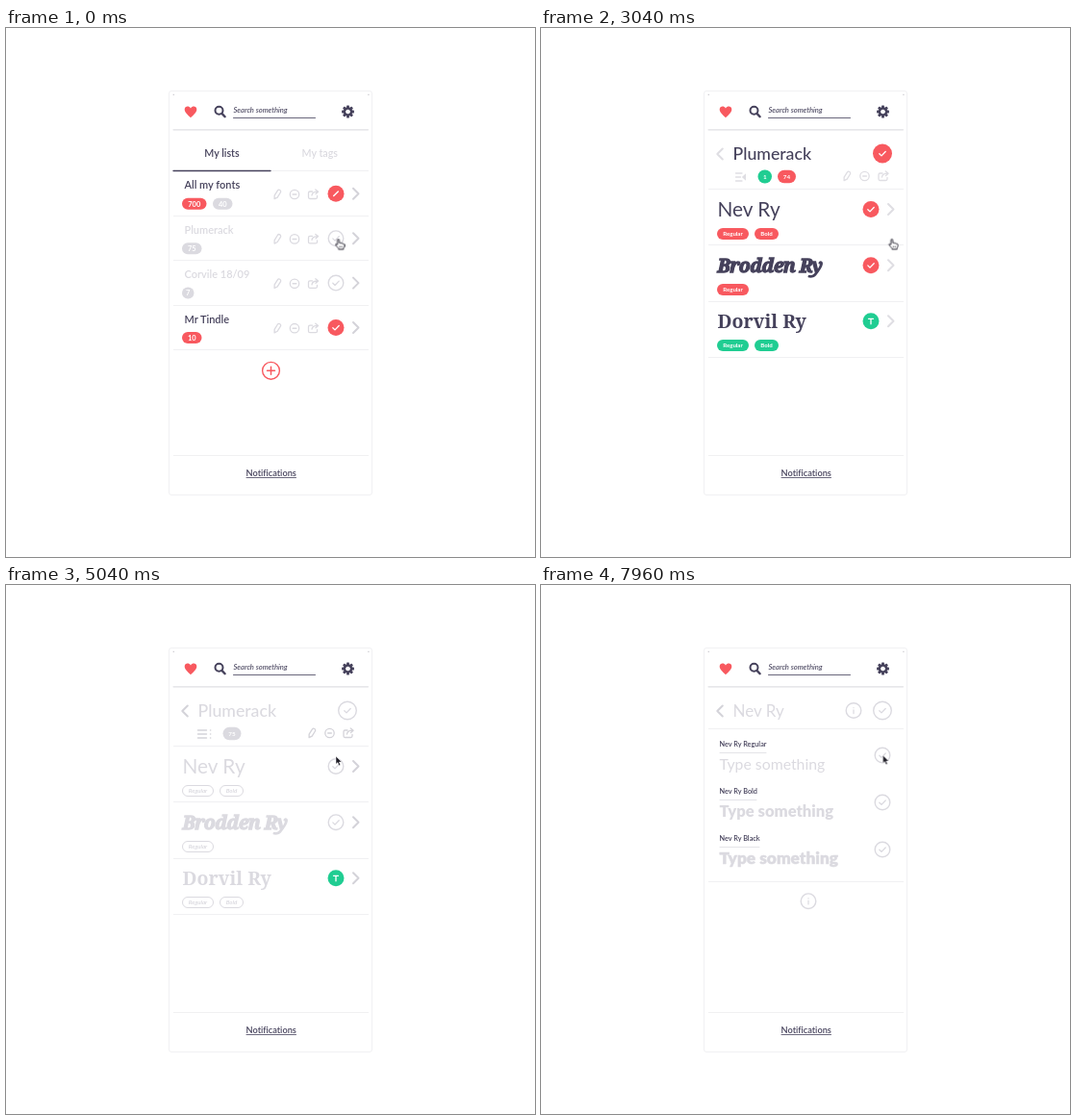
Recreate the animation shown at these times as an HTML page. Size 550 px wide and 550 px high, loop 8 s.

```html
<!DOCTYPE html>
<html lang="en">
<head>
<meta charset="utf-8">
<title>Font lists</title>
<style>
html, body { margin: 0; width: 100%; height: 100%; overflow: hidden; background: #fff; }
svg { display: block; width: 100vw; height: 100vh; --dark: #45415b; --gray: #dbdae0; --red: #f8595f; --green: #20cd92; }
text { font-family: Lato, "Open Sans", sans-serif; font-variant-ligatures: none; }
.line { stroke: #f0f0f2; stroke-width: 1; }
.stroke { fill: none; stroke-linecap: round; stroke-linejoin: round; }
.scene { animation: 8s step-end infinite; }
.lists { animation-name: lists; }
.before { animation-name: before; }
.after { animation-name: after; }
.family-on { animation-name: familyOn; }
.family-off { animation-name: familyOff; }
.styles { animation-name: styles; }
.hand { animation-name: hand; }
.arrow { animation-name: arrow; }
.cursor { animation: move 8s ease-in-out infinite; }
@keyframes lists { 0% { visibility: visible } 22%, 100% { visibility: hidden } }
@keyframes before { 0% { visibility: visible } 5%, 100% { visibility: hidden } }
@keyframes after { 0% { visibility: hidden } 5% { visibility: visible } 22%, 100% { visibility: hidden } }
@keyframes familyOn { 0% { visibility: hidden } 22% { visibility: visible } 51%, 100% { visibility: hidden } }
@keyframes familyOff { 0% { visibility: hidden } 51% { visibility: visible } 75%, 100% { visibility: hidden } }
@keyframes styles { 0% { visibility: hidden } 75%, 100% { visibility: visible } }
@keyframes hand { 0% { visibility: visible } 58% { visibility: hidden } 65% { visibility: visible } 75.5%, 100% { visibility: hidden } }
@keyframes arrow { 0% { visibility: hidden } 58% { visibility: visible } 65% { visibility: hidden } 75.5%, 100% { visibility: visible } }
@keyframes move {
  0%, 10% { transform: translate(345.5px, 219.5px) }
  13.5%, 42.5% { transform: translate(364.7px, 219.5px) }
  47.5%, 52.5% { transform: translate(354.5px, 142px) }
  62%, 63.5% { transform: translate(343px, 178px) }
  68.5%, 75.5% { transform: translate(364px, 186px) }
  79.5%, 92% { transform: translate(358.5px, 155px) }
  98.5%, 100% { transform: translate(355.5px, 177px) }
}
</style>
</head>
<body>
<svg id="stage" viewBox="0 0 550 550"></svg>
<script>
const dark = 'var(--dark)', gray = 'var(--gray)', red = 'var(--red)', green = 'var(--green)';

const group = (name, ...parts) => `<g class="${name}">${parts.join('')}</g>`;
const text = (x, y, size, label, fill = dark, extra = '') =>
  `<text x="${x}" y="${y}" font-size="${size}" fill="${fill}" ${extra}>${label}</text>`;
const path = (d, color, width = 1.3, extra = '') =>
  `<path class="stroke" d="${d}" stroke="${color}" stroke-width="${width}" ${extra}/>`;
const rule = (y, x1 = 174, x2 = 377) => `<path class="line" d="M${x1} ${y + .5}H${x2}"/>`;
const disc = (x, y, r, color, filled) => filled
  ? `<circle cx="${x}" cy="${y}" r="${r}" fill="${color}"/>`
  : `<circle cx="${x}" cy="${y}" r="${r - .7}" fill="none" stroke="${color}" stroke-width="1.4"/>`;

const semibold = 'font-weight="600"', middle = 'text-anchor="middle"';

function pill(x, y, w, label, color, outlined = false, size = 7.5, h = 12) {
  const inset = outlined ? .5 : 0;
  const box = `<rect x="${x + inset}" y="${y - h / 2 + inset}" width="${w - 2 * inset}" height="${h - 2 * inset}" rx="${h / 2 - inset}"`;
  const paint = outlined ? `fill="none" stroke="${color}"` : `fill="${color}"`;
  return `${box} ${paint}/>` + text(x + w / 2, y + size * .36, size, label, outlined ? color : '#fff',
    `font-weight="700" ${middle} ${outlined ? 'font-style="italic"' : ''}`);
}

const check = (x, y, r, on) => disc(x, y, r, on ? red : gray, on) +
  path(`M${x - 3.2} ${y + .2}l2.2 2.2l4.2 -4.4`, on ? '#fff' : gray, 1.3);
const partial = (x, y) => disc(x, y, 8.5, red, true) + path(`M${x - 2.3} ${y + 2.3}l4.6 -4.6`, '#fff', 1.4);
const trial = (x, y, on) => disc(x, y, 8.5, on ? green : gray, on) +
  path(`M${x - 2.5} ${y - 2.5}h5M${x} ${y - 2.5}v5.5`, on ? '#fff' : gray, 1.3);
const info = (x, y) => disc(x, y, 8.5, gray) + path(`M${x} ${y - 3}v.2M${x} ${y - .6}v3.8`, gray, 1.2);
const chevron = (x, y, color = '#d4d3d9') => path(`M${x - 2.5} ${y - 5.5}l5.5 5.5l-5.5 5.5`, color, 2);
const back = (y, color) => path(`M188.8 ${y - 5.5}l-5.5 5.5l5.5 5.5`, color, 2);

function tools(xs, y, color) {
  const [pen, minus, share] = xs;
  return path('M-1.8 -3.5a1.8 1.8 0 0 1 3.6 0V2.5L0 5.5L-1.8 2.5Z', color, 1.3, `transform="translate(${pen} ${y}) rotate(32)"`) +
    `<circle class="stroke" cx="${minus}" cy="${y}" r="4.7" stroke="${color}" stroke-width="1.3"/>` +
    path(`M${minus - 1.8} ${y}h3.6`, color, 1.5) +
    path(`M${share - 1} ${y - 3}h-2.5q-1.5 0 -1.5 1.5v4.5q0 1.5 1.5 1.5h6q1.5 0 1.5 -1.5v-1.5` +
      `M${share - 1.5} ${y + 1}q.5 -3.5 5 -3.8M${share + 2.3} ${y - 5}l2.8 2.2l-2.6 2.3`, color, 1.3);
}

function listRow(i, name, on, pills, mark) {
  const y = 172.3 + i * 46.4;
  return text(185.5, y - 5, 11, name, on ? dark : gray, semibold) + pills(y + 10.5) +
    tools([282, 300, 319.5], y + .7, gray) + (mark || check)(343, y, 8.5, on) + chevron(363.5, y);
}

function familyPage(on) {
  const ink = on ? dark : gray, tool = on ? '#dfdee3' : '#d4d3d9';
  const tag = (x, y, w, label, color) => pill(x, y, w, label, on ? color : gray, !on, 6.1);
  const row = (y, name, size, style, mark) =>
    text(183.5, y + 7.5, size, name, ink, style) + mark(343, y, 8.5, on) + chevron(363.5, y, tool);
  return back(131, tool) + text(199.5, 136.7, 17.7, 'Plumerack', ink, 'font-weight="500"') +
    check(355, 130.5, 10, on) +
    (on
      ? path('M202.5 151h6.5M202.5 155h5M202.5 159h6.5', tool, 1.3) + `<path d="M213 151.3v7.4l-4.2 -3.7z" fill="${tool}"/>` +
        pill(225.5, 154.5, 14.5, '1', green, false, 6.3, 14) + pill(246, 154.5, 19, '74', red, false, 6.3, 13.5)
      : path('M199.5 151h9M199.5 155h9M199.5 159h9M212.5 151h.2M212.5 155h.2M212.5 159h.2', tool, 1.5) +
        pill(225.5, 154.5, 19, '75', gray, false, 6.3, 13.5)) +
    tools([318, 336.5, 356], 154, tool) + [167, 225, 284, 342].map(y => rule(y)).join('') +
    row(188.5, 'Nev Ry', 20.8, '', check) +
    tag(183, 214, 33, 'Regular', red) + tag(222, 214, 25, 'Bold', red) +
    row(246.7, 'Brodden Ry', 19.5,
      `style="font:italic 900 19.5px 'Noto Serif',serif;letter-spacing:-.6px" stroke="${ink}" stroke-width="1.3"`, check) +
    tag(183, 272, 33, 'Regular', red) +
    row(304.8, 'Dorvil Ry', 19.5, `style="font:600 19.5px 'Noto Serif',serif"`, trial) +
    tag(183, 330, 33, 'Regular', green) + tag(222, 330, 25, 'Bold', green);
}

function styleRow(y, style, width, size, weight, extra = '') {
  return text(185.5, y - 9.5, 7.3, 'Nev Ry ' + style, dark, semibold) +
    path(`M186 ${y - 2.5}h${width}`, '#e4e4e8', 1) +
    text(185.5, y + 15, size, 'Type something', gray, `font-weight="${weight}" ${extra}`) + check(355, y, 8.5, false);
}

const gearTeeth = Array.from({ length: 8 }, (_, i) =>
  `<rect x="-1.4" y="-6.4" width="2.8" height="4" rx=".5" transform="rotate(${i * 45})"/>`).join('');

const frame =
  `<rect x="169.5" y="65.5" width="211" height="420" rx="2.5" fill="#fff" stroke="#f1f1f3"/>` +
  path('M174 69.3h.6M376.6 69.3h.6', '#a9a8b0', .7) +
  `<path d="M192 93.2C188.5 90 185.7 87.6 185.7 84.8C185.7 81.3 190 80.3 192 83.5C194 80.3 198.3 81.3 198.3 84.8C198.3 87.6 195.5 90 192 93.2Z" fill="${red}"/>` +
  `<circle class="stroke" cx="221.5" cy="85.8" r="4" stroke="${dark}" stroke-width="2"/>` +
  path('M224.8 89.2l2.8 3', dark, 2.4) +
  text(236.5, 88, 7.6, 'Search something', dark, 'font-style="italic" font-weight="500"') +
  path('M236.5 93.5H321.5', dark, .8) +
  `<g transform="translate(355.5 87)" fill="${dark}">${gearTeeth}<circle r="3.6" fill="none" stroke="${dark}" stroke-width="2.2"/></g>` +
  path('M174 105.8H376.5', '#e0e0e4', 1.2) + rule(444) +
  text(275.7, 465.8, 9.2, 'Notifications', dark, `${semibold} ${middle}`) + path('M250 467.5H301.5', dark, .8);

const lists =
  text(224.5, 133.7, 10.7, 'My lists', dark, `${semibold} ${middle}`) +
  text(326.3, 133.7, 10.7, 'My tags', gray, `${semibold} ${middle}`) +
  [148, 195, 241, 288, 334].map(y => rule(y)).join('') +
  path('M174 148.5H275', dark, 1.3) +
  listRow(0, 'All my fonts', true, y => pill(183, y, 25.5, '700', red) + pill(215, y, 20.5, '40', gray), partial) +
  listRow(2, 'Corvile 18/09', false, y => pill(183, y, 12.5, '7', gray)) +
  listRow(3, 'Mr Tindle', true, y => pill(183, y, 20.5, '10', red)) +
  disc(275.5, 356.3, 9.6, red) + path('M271.5 356.3h8M275.5 352.3v8', red, 1.5);

const styles =
  back(131, '#d4d3d9') + text(199.5, 136.7, 17, 'Nev Ry', gray) +
  info(325, 130.5) + check(355, 130.5, 10, false) + rule(149) +
  styleRow(177, 'Regular', 48, 15.8, 400) +
  styleRow(226, 'Bold', 38, 16.6, 900) +
  styleRow(275, 'Black', 41, 17.3, 900, `stroke="${gray}" stroke-width=".5"`) +
  rule(308) + info(278, 328.7);

const hand = `<path d="M-.9 1Q-.9 0 0 0Q1 0 1 1V4Q2.2 3.4 2.9 4.3Q4 3.8 4.6 4.8Q6.4 4.6 6.4 6.3Q6.4 8 5.4 9.3V10.6H.2V9.6Q-1.5 8 -3 5.7Q-3 4.2 -.9 5.7Z"
  fill="#fff" stroke="#302e3a" stroke-width="1" stroke-linejoin="round"/><path d="M1.6 7v2M3.4 7v2" stroke="#302e3a" stroke-width=".6"/>`;
const arrow = `<path d="M0 0V8.3L1.9 6.6L3.2 9.7L4.7 9L3.4 6.1H6Z" fill="#1d1b24" stroke="#fff" stroke-width=".5"/>`;

document.getElementById('stage').innerHTML =
  frame +
  group('scene lists', lists) +
  group('scene before', listRow(1, 'Plumerack', false, y => pill(183, y, 20.5, '75', gray))) +
  group('scene after', listRow(1, 'Plumerack', true, y => pill(183, y, 12.5, '1', green) + pill(202, y, 20.5, '74', red))) +
  group('scene family-on', familyPage(true)) +
  group('scene family-off', familyPage(false)) +
  group('scene styles', styles) +
  group('cursor', group('scene hand', hand), group('scene arrow', arrow));
</script>
</body>
</html>
```
